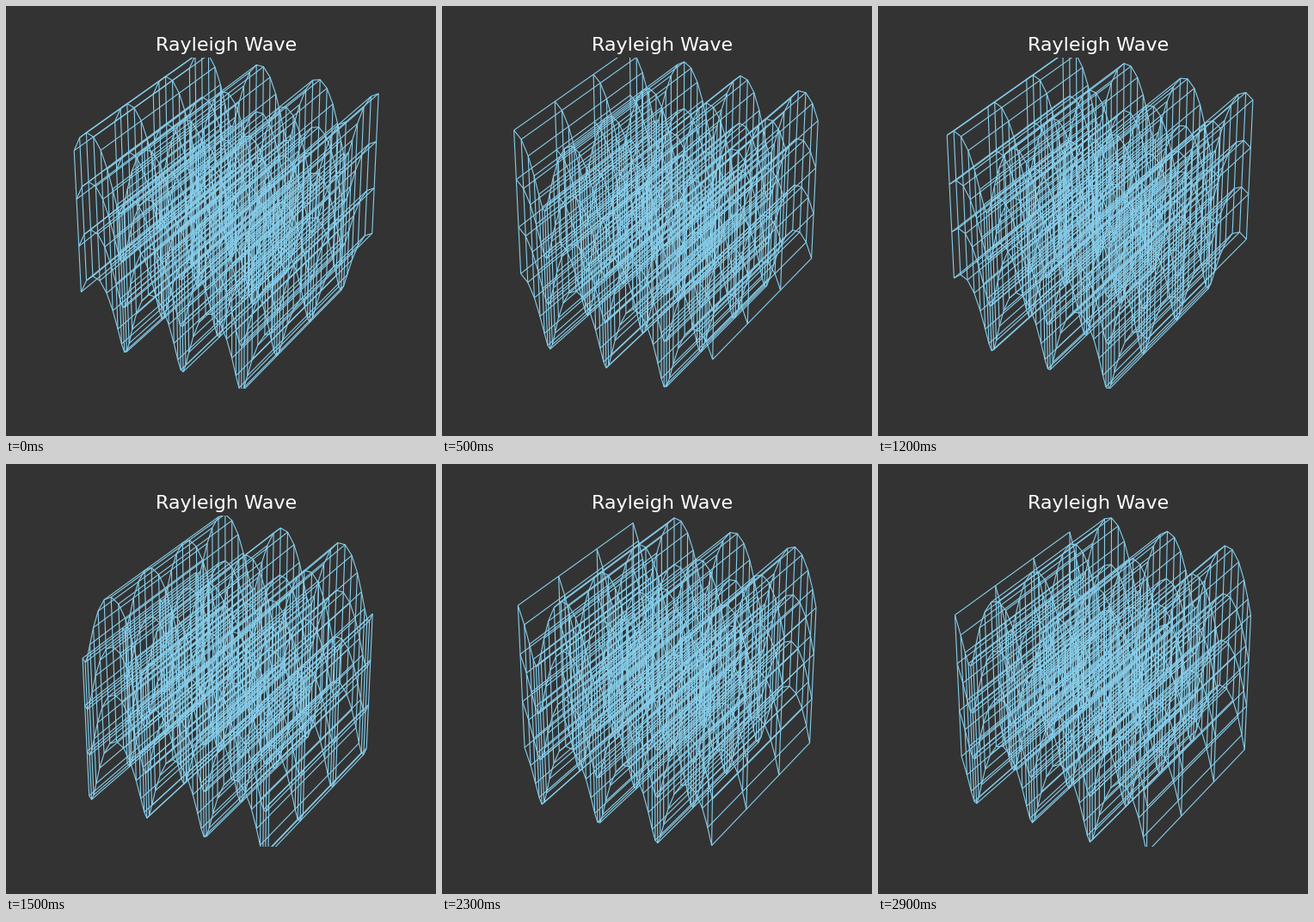
Animation, 500 px wide and 500 px high, one loop 3000 ms. Source, as a matplotlib script:

```python
import numpy as np
import matplotlib.pyplot as plt
from matplotlib.animation import FuncAnimation
from mpl_toolkits.mplot3d.art3d import Line3DCollection

FRAMES = 30
INTERVAL = 100
AMPLITUDE = 0.5
DARK = "#333333"

# Block of ground: the wave travels along x, z is depth
X, Y, Z = np.meshgrid(
    np.linspace(-20, 0, 40),
    np.linspace(0, 2, 4),
    np.linspace(0, 2, 4),
    indexing="ij",
)


def move_nodes(time):
    """Lattice nodes, each displaced along its circular orbit."""
    phase = X - time
    return np.stack(
        [X + AMPLITUDE * np.sin(phase), Y, Z + AMPLITUDE * np.cos(phase)], axis=-1
    )


def lines_along(nodes, axis):
    """All lattice lines that run along one axis."""
    along = np.moveaxis(nodes, axis, 2)
    return along.reshape(-1, along.shape[2], 3)


fig = plt.figure(figsize=(5, 5), dpi=100, facecolor=DARK)
ax = fig.add_subplot(projection="3d", facecolor=DARK)
ax.view_init(elev=30, azim=-60)
ax.set_axis_off()
ax.set_title("Rayleigh Wave", color="white", fontsize=16, fontname="DejaVu Sans")

start = move_nodes(0)
meshes = [
    Line3DCollection(lines_along(start, axis), colors="skyblue", linewidths=0.8)
    for axis in range(3)
]
for mesh in meshes:
    ax.add_collection3d(mesh)
ax.set(xlim=(-20, 0), ylim=(0, 2), zlim=(0, 2))


def update(frame):
    nodes = move_nodes(frame)
    for axis, mesh in enumerate(meshes):
        mesh.set_segments(lines_along(nodes, axis))
    return meshes


anim = FuncAnimation(
    fig, update, frames=FRAMES, interval=INTERVAL, repeat=True, repeat_delay=0
)
plt.show()
```
